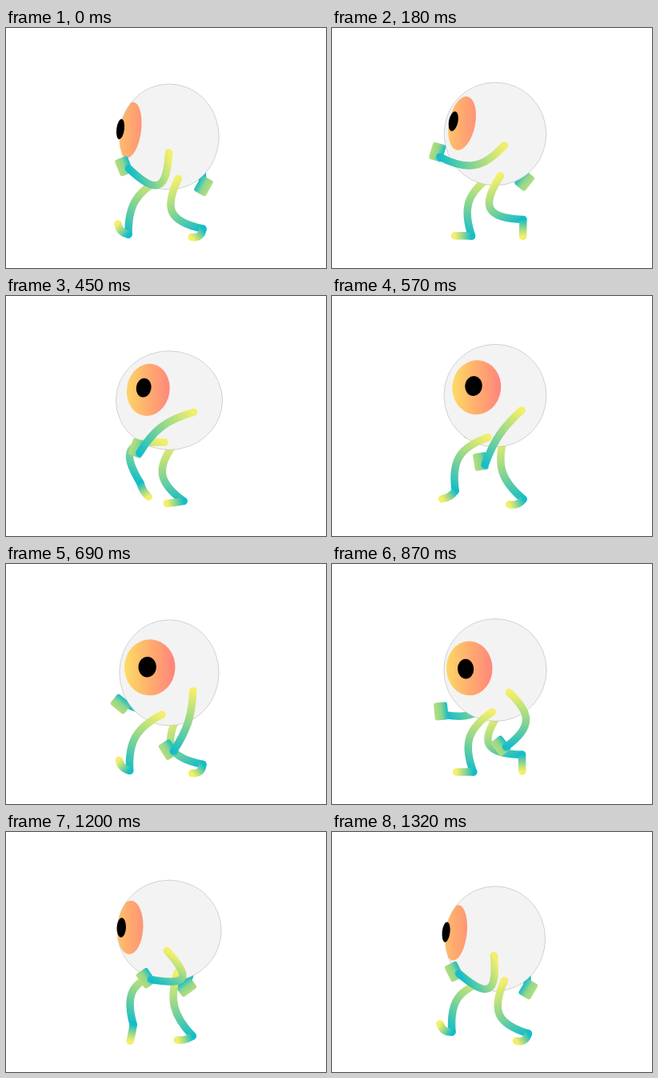
An HTML page with a canvas that plays this animation: 400x300 px, repeating every 1.35 s.

```html
<!DOCTYPE html>
<html lang="en">
<head>
<meta charset="utf-8">
<title>Walking eye</title>
<style>
  html, body { margin: 0; width: 100%; height: 100%; overflow: hidden; background: #fff; }
  canvas { display: block; width: 400px; height: 300px; }
</style>
</head>
<body>
<canvas id="stage" width="400" height="300"></canvas>
<script>
const LOOP = 1350, STEP = 30, TAU = 2 * Math.PI, RAD = Math.PI / 180;
const CX = 204, HIP_DROP = 52.3, HALF_LEG = 43, FOOT = 21;
const YELLOW = '#f3ef69', LIME = '#b5de7c', GREEN = '#8ed68d', TEAL = '#14bdc9';
const ctx = document.getElementById('stage').getContext('2d');

// One swing per loop plus an optional second at double rate; peaks in ms.
function wave(t, mean, amp, peak, amp2 = 0, peak2 = 0) {
  const w = TAU / LOOP;
  return mean + amp * Math.cos(w * (t - peak)) + amp2 * Math.cos(2 * w * (t - peak2));
}

// Periodic monotone cubic through [time, ...values].
function track(period, keys) {
  const n = keys.length;
  const at = i => keys[(i + n) % n];
  const time = i => at(i)[0] + Math.floor(i / n) * period;
  const slope = (i, c) => (at(i + 1)[c] - at(i)[c]) / (time(i + 1) - time(i));
  const tangent = (i, c) => {
    const a = slope(i - 1, c), b = slope(i, c);
    return a * b > 0 ? 2 * a * b / (a + b) : 0;
  };
  return ms => {
    const t = ms % period;
    let i = n - 1;
    while (time(i) > t) i--;
    const h = time(i + 1) - time(i), u = (t - time(i)) / h, v = 1 - u;
    return at(i).slice(1).map((p, k) => {
      const c = k + 1;
      return v * v * (1 + 2 * u) * p + u * u * (3 - 2 * u) * at(i + 1)[c]
        + h * u * v * (v * tangent(i, c) - u * tangent(i + 1, c));
    });
  };
}

// Body height: sinks, then hops, once per step.
const bounce = track(LOOP / 2, [
  [0, 136], [180, 132.4], [405, 141], [450, 130.5], [540, 123], [645, 133.5]
]);

// Ankle x, y, foot direction, foot curl.
const stride = track(LOOP, [
  [0, 246, 251, 143, -.5],
  [185, 238.5, 239, 90, 0],
  [405, 173, 219, 73, .15],
  [450, 168, 234, 59, .15],
  [645, 150, 250, 214, -.4],
  [675, 153, 258, 225, -.35],
  [865, 176, 260, 180, 0],
  [1090, 217, 257, 174, 0]
]);

function blend(x0, y0, x1, y1, ...colors) {
  const g = ctx.createLinearGradient(x0, y0, x1, y1);
  colors.forEach((c, i) => g.addColorStop(i / (colors.length - 1), c));
  return g;
}

function ellipse(x, y, rx, ry, tilt = 0) {
  ctx.beginPath();
  ctx.ellipse(x, y, rx, ry, tilt * RAD, 0, TAU);
}

// Soft arc whose middle stands off the chord by `bend`.
function limb(x, y, ex, ey, bend) {
  const dx = ex - x, dy = ey - y, k = .75;
  const s = bend / (.75 * k * Math.hypot(dx, dy));
  const jx = (x + ex) / 2 + dy * s, jy = (y + ey) / 2 - dx * s;
  ctx.strokeStyle = blend(x, y, ex, ey, YELLOW, GREEN, TEAL);
  ctx.beginPath();
  ctx.moveTo(x, y);
  ctx.bezierCurveTo(x + k * (jx - x), y + k * (jy - y),
    ex + k * (jx - ex), ey + k * (jy - ey), ex, ey);
  ctx.stroke();
}

function leg(t, hy) {
  const hx = wave(t, 205, 10.5, 1310);
  const [ax, ay, angle, curl] = stride(t);
  const half = Math.hypot(ax - hx, ay - hy) / 2;
  limb(hx, hy, ax, ay, -Math.sqrt(Math.max(0, HALF_LEG ** 2 - half ** 2)));

  const len = FOOT * (1 - .35 * Math.abs(curl));
  const dx = len * Math.cos(angle * RAD), dy = len * Math.sin(angle * RAD);
  ctx.strokeStyle = blend(ax, ay, ax + dx, ay + dy, TEAL, GREEN, YELLOW);
  ctx.beginPath();
  ctx.moveTo(ax, ay);
  ctx.quadraticCurveTo(ax + dx / 2 - dy * curl, ay + dy / 2 + dx * curl, ax + dx, ay + dy);
  ctx.stroke();
}

function fist(x, y, angle) {
  ctx.save();
  ctx.translate(x, y);
  ctx.rotate(angle * RAD);
  ctx.fillStyle = blend(4, 0, -13, 0, TEAL, GREEN, LIME);
  ctx.beginPath();
  ctx.roundRect(-13, -16, 17, 22, 3);
  ctx.fill();
  ctx.restore();
}

function farArm(t, cy) {
  const x = wave(t, 199, 53, 110, 9, 510);
  const y = cy + wave(t, 52.5, 12.5, 1170, 6, 338);
  limb(200, cy + 15, x, y, 20);
  fist(x, y, wave(t, -98, 68, 850, 25, 195));
}

function nearArm(t, cy) {
  const x = wave(t, 179, 41.5, 860, 3, 560);
  const y = cy + wave(t, 66.5, 35, 805, 4, 560);
  fist(x, y, wave(t, -13, 33, 310, 13, 330));
  limb(wave(t, 219, 18, 560), cy + wave(t, 21, 8, 980), x, y,
    wave(t, 16, 21, 1170, 5, 110));
}

function eyeball(t, cy) {
  const rx = wave(t, 64.6, 0, 0, 2.5, 380), ry = 4115 / rx;
  const dy = wave(t, -7.8, 6.7, 990), tilt = wave(t, 5, 7, 270);
  const x = wave(t, 167.6, 13.3, 600), y = cy + dy;
  const irx = wave(t, 22.8, 9, 690), iry = ry * .53;
  const edge = x + irx + (30 - irx) * .8;

  ellipse(CX, cy, rx, ry);
  ctx.fillStyle = '#f3f3f3';
  ctx.fill();
  ctx.lineWidth = .5;
  ctx.strokeStyle = '#aaa';
  ctx.stroke();
  ctx.save();
  ctx.clip();
  ellipse(x, y, irx, iry, tilt);
  ctx.fillStyle = blend(edge - 64, y, edge, y, '#fbe164', '#ffb06d', '#ff857c');
  ctx.fill();
  ctx.restore();
  ellipse(x + irx / 2 - 19, y - 1 + .3 * (dy + 8), irx * .35, iry * .365, tilt);
  ctx.fillStyle = '#000';
  ctx.fill();
}

function draw(t) {
  const [cy] = bounce(t);
  ctx.fillStyle = '#fff';
  ctx.fillRect(0, 0, 400, 300);
  ctx.lineCap = ctx.lineJoin = 'round';
  ctx.lineWidth = 9.5;
  farArm(t, cy);
  leg(t + LOOP / 2, cy + HIP_DROP);
  eyeball(t, cy);
  ctx.lineWidth = 9.5;
  leg(t, cy + HIP_DROP);
  nearArm(t, cy);
}

const start = performance.now();
function tick() {
  const t = (performance.now() - start) % LOOP;
  draw(Math.floor(t / STEP) * STEP);
  requestAnimationFrame(tick);
}
tick();
</script>
</body>
</html>
```
